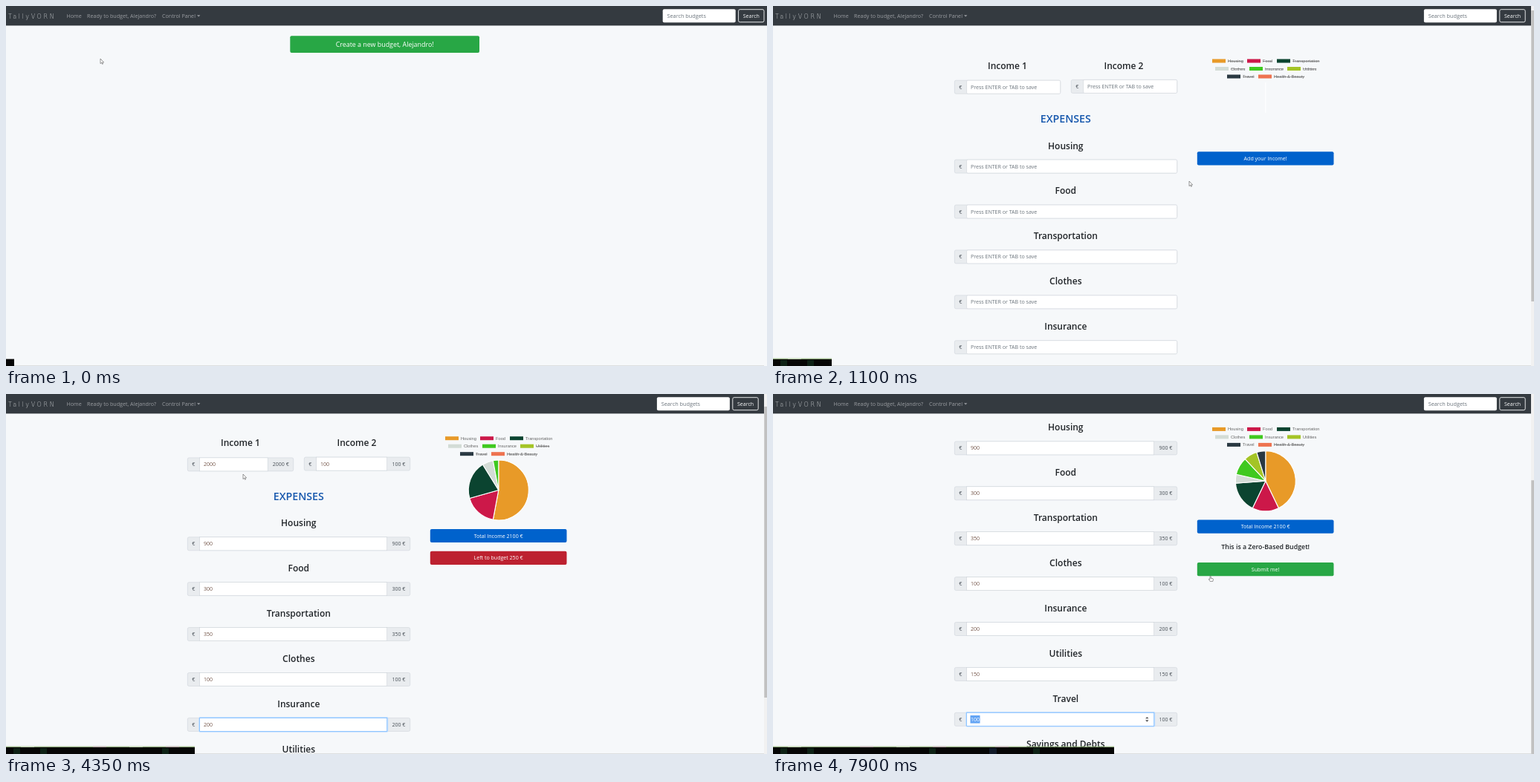
Animation, 1024 px wide and 485 px high, one loop 8 s. Source, as an HTML page:

```html
<!DOCTYPE html>
<html lang="en">
<head>
<meta charset="utf-8">
<title>Budget planner</title>
<style>
html, body { margin: 0; width: 100%; height: 100%; overflow: hidden; background: #f6f8fa; }
svg { display: block; width: 1024px; height: 485px; font-family: "Open Sans", "Noto Sans", sans-serif; }
</style>
</head>
<body>
<svg id="stage" viewBox="0 0 1024 485" xmlns="http://www.w3.org/2000/svg"></svg>
<script>
const LOOP = 8000, BASE = 7.05, ROW = 60.9;
const stage = document.getElementById('stage');
const names = ['Income 1', 'Income 2', 'Housing', 'Food', 'Transportation', 'Clothes',
  'Insurance', 'Utilities', 'Travel', 'Savings and Debts'];
const colors = ['#e89a28', '#cc1849', '#0b4430', '#d3dcd6', '#3fc91f', '#a4c426', '#2a3942', '#ee7350'];
// legend: name, swatch x, row
const legend = [['Housing', 591, 0], ['Food', 638, 0], ['Transportation', 678, 0], ['Clothes', 595, 1],
  ['Insurance', 641, 1], ['Utilities', 692, 1], ['Travel', 611, 2], ['Health & Beauty', 653, 2]];

// Each step changes only what it names; type = [field, value], save = field.
const steps = [
  [0, { page: 'home', cur: ['arrow', 127, 71] }],
  [30, { hover: true, cur: ['hand', 500, 52] }],
  [220, { page: 'budget', modal: true, cur: ['beam', 500, 54] }],
  [440, { cur: ['beam', 528, 136] }],
  [660, { cur: ['hand', 560, 229] }],
  [690, { cur: ['hand', 560, 236] }],
  [910, { press: true }],
  [1100, { modal: false, cur: ['arrow', 560, 236] }],
  [1320, { focus: 0, spin: [0], cur: ['beam', 319.5, 109] }],
  [1540, { type: [0, '2000'] }],
  [1760, { save: 0, focus: 1, spin: [0, 1] }],
  [1790, { type: [1, '100'] }],
  [1980, { save: 1, focus: 2, spin: [0, 2] }],
  [2200, { type: [2, '900'] }],
  [2420, { save: 2, focus: 3, spin: [0, 3], pie: [900], sweep: 0.7 }],
  [2640, { sweep: 1 }],
  [2860, { type: [3, '30'] }],
  [2890, { type: [3, '300'] }],
  [3070, { save: 3, focus: 4, spin: [0, 4], pie: [900, 135] }],
  [3260, { pie: [900, 300] }],
  [3480, { type: [4, '350'] }],
  [3700, { save: 4, focus: 5, spin: [0, 5], pie: [900, 300, 230] }],
  [3920, { type: [5, '100'], pie: [900, 300, 350] }],
  [3950, { save: 5, focus: 6, spin: [0, 6], pie: [900, 300, 350, 40] }],
  [4130, { type: [6, '200'], pie: [900, 300, 350, 100] }],
  [4350, { save: 6, spin: [], scroll: 14.3, cur: ['arrow', 319, 108], pie: [900, 300, 350, 100, 50] }],
  [4380, { scroll: 40, pie: [900, 300, 350, 100, 90] }],
  [4600, { scroll: 110, pie: [900, 300, 350, 100, 200] }],
  [4820, { scroll: 143.2, cur: ['arrow', 350, 240] }],
  [5040, { cur: ['beam', 394, 376], focus: 7, spin: [7] }],
  [5070, { type: [7, '20'] }],
  [5260, { type: [7, '200'] }],
  [5470, { save: 7, focus: 8, spin: [7, 8], pie: [900, 300, 350, 100, 200, 120] }],
  [5690, { pie: [900, 300, 350, 100, 200, 200] }],
  [5910, { type: [8, '100'] }],
  [6130, { save: 8, spin: [], cur: ['arrow', 393.5, 320], pie: [900, 300, 350, 100, 200, 200, 60] }],
  [6330, { focus: -1, cur: ['arrow', 393.5, 275], pie: [900, 300, 350, 100, 200, 200, 100] }],
  [6550, { cur: ['beam', 395, 376], spin: [7] }],
  [6770, { focus: 7, select: 7 }],
  [6990, { type: [7, '150'], select: -1 }],
  [7210, { save: 7, focus: 8, select: 8, spin: [7, 8], pie: [900, 300, 350, 100, 200, 180, 100] }],
  [7240, { pie: [900, 300, 350, 100, 200, 165, 100] }],
  [7430, { pie: [900, 300, 350, 100, 200, 150, 100] }],
  [7640, { cur: ['arrow', 480, 312], spin: [8] }],
  [7870, { cur: ['arrow', 572, 256] }],
  [7900, { cur: ['hand', 589, 249] }]
];
const stripKeys = [[0, 11], [220, 30], [1100, 79], [3070, 186], [4350, 254], [6330, 371], [7900, 459]];

const rect = (x, y, w, h, fill, r = 0, extra = '') =>
  `<rect x="${x}" y="${y}" width="${w}" height="${h}" fill="${fill}" rx="${r}" ${extra}/>`;
// y is the middle of the line
const text = (x, y, str, size = BASE, fill = '#212529', anchor = 'start', weight = 400) =>
  `<text x="${x}" y="${y + size * 0.36}" font-size="${size}" fill="${fill}" text-anchor="${anchor}" font-weight="${weight}">${str}</text>`;
const line = (x1, y1, x2, y2, color, w = 1) =>
  `<path d="M${x1} ${y1}L${x2} ${y2}" stroke="${color}" stroke-width="${w}" fill="none"/>`;
const button = (x, y, w, h, fill, label, color = '#fff', size = BASE) =>
  rect(x, y, w, h, fill, 2) + text(x + w / 2, y + h / 2, label, size, color, 'middle');

function stateAt(t) {
  const s = { scroll: 0, focus: -1, select: -1, spin: [], pie: [], sweep: 1, typed: {}, saved: {}, at: 0 };
  for (const [time, change] of steps) {
    if (time > t) break;
    Object.assign(s, change);
    s.at = time;
    if (change.type) s.typed[change.type[0]] = change.type[1];
    if ('save' in change) s.saved[change.save] = +s.typed[change.save];
  }
  return s;
}

function stripWidth(t) {
  let i = 0;
  while (i < stripKeys.length - 2 && stripKeys[i + 1][0] <= t) i++;
  const [t0, w0] = stripKeys[i], [t1, w1] = stripKeys[i + 1];
  return w0 + (w1 - w0) * (t - t0) / (t1 - t0);
}

function navbar(s) {
  const home = s.page === 'home', dx = home ? 0 : s.modal ? -15 : -7.8;
  const gray = '#9a9da1';
  return rect(0, 0, home ? 1024 : 1020, 26.4, '#343a40') +
    '<text x="3" y="16.8" font-family="DejaVu Sans, sans-serif" font-weight="200" font-size="8" letter-spacing="2.6" fill="#c9ccce">TallyVORN</text>' +
    text(81.5, 13.3, 'Home', 7.15, gray) +
    text(109, 13.3, 'Ready to budget, Alejandro?', 7.15, gray) +
    text(210, 13.3, 'Control Panel', 7.15, gray) +
    `<path d="M257 12.3h4.4l-2.2 2.3z" fill="${gray}"/>` +
    rect(883.7 + dx, 4.2, 98, 18, '#fff', 2) +
    text(889.5 + dx, 13.3, 'Search budgets', 7.3, '#6c757d') +
    rect(985.6 + dx, 4.7, 34.4, 17, 'none', 2, 'stroke="#f8f9fa" stroke-width=".9"') +
    text(1002.8 + dx, 13.3, 'Search', BASE, '#f8f9fa', 'middle');
}

function spinner(x, y) {
  return `<path d="M${x - 2.2} ${y - 1}h4.4l-2.2 -2.4zM${x - 2.2} ${y + 1}h4.4l-2.2 2.4z" fill="#505050"/>`;
}

function field(s, i) {
  const income = i < 2;
  const x = i === 1 ? 401 : 244, right = i === 0 ? 387 : 544;
  const head = income ? 80.2 : 188.2 + ROW * (i - 2);
  const y = income ? (i ? 108.4 : 109.2) : head + 27.9;
  const mid = i === 0 ? 315.5 : i === 1 ? 472 : 393.8;
  const done = i in s.saved, focused = s.focus === i, picked = s.select === i;
  const end = done ? right - (s.saved[i] > 999 ? 34.5 : 31) : right;
  const edge = 'stroke="#ced4da" stroke-width=".6"', tx = x + 22;
  let out = text(mid, head, names[i], 12, '#212529', 'middle', 600) +
    rect(x + .3, y - 9, right - x - .6, 18, '#e9ecef', 2, edge) +
    text(x + 8.3, y, '€', BASE, '#495057', 'middle');
  if (focused) out += rect(x + 15.2, y - 10.3, end - x - 13.9, 20.6, '#bfdeff', 2);
  out += rect(x + 16.6, y - 9, end - x - 16.9, 18, '#fff', done ? 0 : 1.5,
    focused ? 'stroke="#80bdff" stroke-width=".8"' : edge);
  const val = s.typed[i];
  if (picked) out += rect(tx - .5, y - 5.3, 13, 10.6, '#63a4f4');
  out += val ? text(tx, y, val, BASE, picked ? '#fff' : '#735548')
    : text(tx, y, 'Press ENTER or TAB to save', BASE, '#6c757d');
  if (focused && !val) out += line(tx + .3, y - 5, tx + .3, y + 5, '#333', .6);
  if (done) out += text((end + right) / 2, y, s.saved[i] + ' €', BASE, '#495057', 'middle');
  if (s.spin.includes(i)) out += spinner(end - 9.7, y);
  return out;
}

function pie(s) {
  const cx = 662.8, cy = 143.8, r = 40.5;
  const sum = s.pie.reduce((a, b) => a + b, 0);
  if (!sum) return line(cx, 103, cx, cy, '#fff', 1.2);
  const point = a => `${cx + r * Math.sin(a)} ${cy - r * Math.cos(a)}`;
  let from = 0;
  return s.pie.map((v, i) => {
    const to = from + Math.min(v / sum * s.sweep, .9999) * 2 * Math.PI;
    const d = `M${cx} ${cy}L${point(from)}A${r} ${r} 0 ${to - from > Math.PI ? 1 : 0} 1 ${point(to)}Z`;
    from = to;
    return `<path d="${d}" fill="${colors[i]}" stroke="#fff" stroke-width="1.1" stroke-linejoin="round"/>`;
  }).join('');
}

function panel(s) {
  let out = legend.map(([name, x, row], i) => {
    const y = 74 + row * 10.5;
    const label = `<text x="${x + 21}" y="${y + 2}" font-family="Liberation Sans, sans-serif" font-size="5.7" fill="#666"` +
      `${i + 2 in s.saved ? '' : ' text-decoration="line-through"'}>${name.replace('&', '&amp;')}</text>`;
    return rect(x, y - 2.5, 18, 5, colors[i]) + label;
  }).join('') + pie(s);
  let income = 0, spent = 0;
  for (const i in s.saved) i < 2 ? income += s.saved[i] : spent += s.saved[i];
  const left = income - spent;
  const bar = (y, fill, label, color) => button(570.8, y, 183.7, 18.2, fill, label, color);
  out += bar(196.2, '#0062cc', income ? `Total Income ${income} €` : 'Add your Income!');
  if (!income) return out;
  if (left) out += bar(226, '#bd2130', `Left to budget ${left} €`);
  else out += text(662.7, 232.2, 'This is a Zero-Based Budget!', 8.8, '#212529', 'middle', 600) +
    bar(253.6, '#28a745', 'Submit me!');
  if (left < 0) out += bar(255.8, '#ffc107', 'You are overspending!', '#3b3a30');
  return out;
}

function modal(s) {
  const bold = str => `<tspan font-weight="700">${str}</tspan>`;
  const lines = [[74.8, 'A Zero-Based budget is a bit special:'],
    [93.6, '- your income minus your expenses ' + bold('MUST equal zero.')],
    [112.5, '- that means you have to ' + bold('allocate EVERY EURO') + ' inside a category'],
    [131.4, "- the program won't let you save the budget otherwise"],
    [150.3, "- if there's some money you don't want to spend, allocate it inside"],
    [161.5, 'the ' + bold('Savings Category!')],
    [180.4, '- if you miss any important category, rest assured I am working'],
    [191.6, 'on adding custom categories in the near future']];
  return rect(0, 0, 1024, 485, '#000', 0, 'opacity=".5"') +
    rect(392.7, 13.5, 235, 243, '#fff', 2.5, 'stroke="#555" stroke-width=".5"') +
    text(400, 29.5, 'Need help?', 10.6, '#212529', 'start', 600) +
    text(615.3, 28, '×', 11, '#777', 'middle', 600) +
    line(393, 45.3, 627.5, 45.3, '#dee2e6', .7) + line(393, 223.3, 627.5, 223.3, '#dee2e6', .7) +
    text(400, 59.6, 'Instructions to create your first Zero-Based Budget!', 8.78, '#212529', 'start', 600) +
    lines.map(([y, str]) => text(400, y, str)).join('') +
    text(400, 210.4, 'Learn more here', BASE, '#007bff') +
    button(524.5, 231.3, 30.2, 17.8, '#6c757d', 'Close') +
    button(558.7, 231.3, 61, 17.8, s.press ? '#0062cc' : '#007bff', 'Let me budget');
}

function cursor([kind, x, y]) {
  const shape = {
    arrow: '<path d="M0 0V6.6L1.6 5.2L2.6 7.4L3.5 7L2.6 4.9H4.6Z" fill="#fff" stroke="#555" stroke-width=".6"/>',
    beam: '<path d="M-1.8 -3.6H1.8M0 -3.6V3.6M-1.8 3.6H1.8" fill="none" stroke="#222" stroke-width=".9"/>',
    hand: '<path d="M-1 -3.4Q-.3 -4 .2 -3.3V-.8L3 -.2Q3.6 .2 3.4 1.2L2.8 3.4H-.8L-2.8 .6Q-2.4 -.3 -1 .6Z" fill="#fff" stroke="#555" stroke-width=".6"/>'
  }[kind];
  return `<g transform="translate(${x} ${y})">${shape}</g>`;
}

function strip(t) {
  const w = stripWidth(t);
  const part = (x, len, y, h, fill) => x < w ? rect(x, y, Math.min(len, w - x), h, fill) : '';
  let out = rect(0, 475.6, w, 9.4, '#050505');
  if (t < 220) return out;
  out += rect(0, 474.7, w, 1, '#93b878');
  for (const x of [20, 117, 166, 215, 299]) out += part(x, 18, 474.7, 1, x % 2 ? '#c9a9bd' : '#d5e3c8');
  for (const x of [10, 46, 210, 350]) out += part(x, 9, 477, 8, '#0d2115');
  return out + part(291, 10, 477, 8, '#111a29');
}

function budgetPage(s) {
  const list = names.map((_, i) => field(s, i)).join('');
  return `<g transform="translate(0 ${-s.scroll})">${list}` +
    text(393.8, 151.8, 'EXPENSES', 14.2, '#1557ad', 'middle', 600) + '</g>' +
    `<g transform="translate(0 ${-Math.min(s.scroll, 26.6)})">${panel(s)}</g>` +
    rect(1020, 0, 4, 485, '#f1f1f1') +
    rect(1020.3, 6 + s.scroll * .77, 3.7, 392, '#c1c1c1');
}

function render(t) {
  const s = stateAt(t);
  const body = s.page === 'home'
    ? button(382.3, 40.3, 254.7, 22.7, s.hover ? '#218838' : '#28a745', 'Create a new budget, Alejandro!', '#fff', 8.9)
    : budgetPage(s);
  stage.innerHTML = rect(0, 0, 1024, 485, '#f6f8fa') + body + navbar(s) +
    rect(0, 484, 1020, 1, '#dcdedf') + (s.modal ? modal(s) : '') + strip(s.at) + cursor(s.cur);
  return s.at;
}

let shown = -1;
function tick(now) {
  const t = now % LOOP;
  const at = steps.reduce((a, [time]) => time <= t ? time : a, 0);
  if (at !== shown) shown = render(t);
  requestAnimationFrame(tick);
}
const start = performance.now();
shown = render(0);
requestAnimationFrame(function loop() {
  tick.call(null, Math.max(0, performance.now() - start));
});
</script>
</body>
</html>
```
